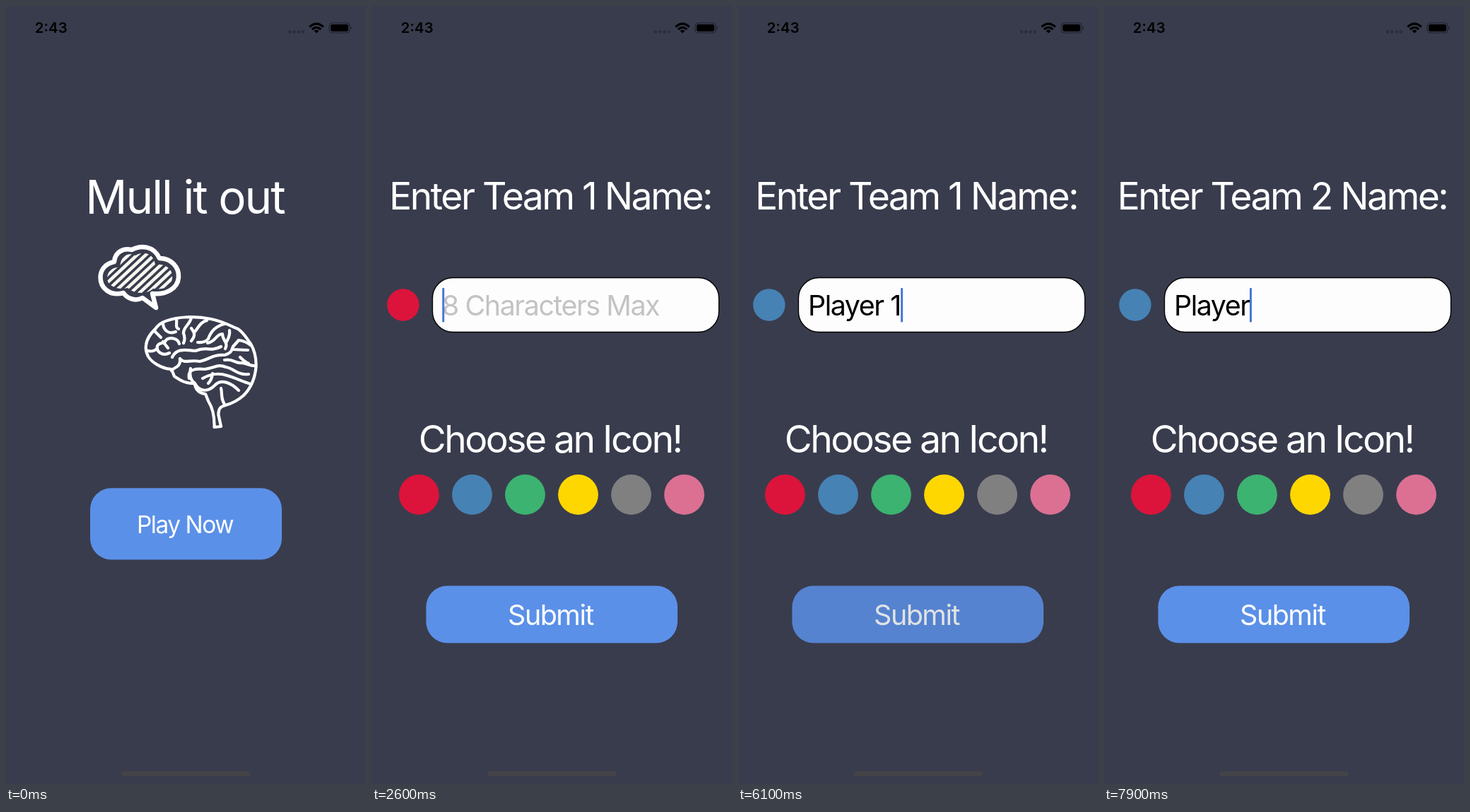
Animation of 509x1101 px, one loop 8000 ms. Source, as an HTML page:

```html
<!DOCTYPE html>
<html lang="en">
<head>
<meta charset="utf-8">
<title>Quiz setup</title>
<style>
html, body { margin: 0; height: 100%; overflow: hidden; background: #393c4d; }
svg { display: block; width: 100%; height: 100%; }
text { font-family: Inter, Roboto, "Liberation Sans", sans-serif; fill: #fff; white-space: pre; }
.mid { text-anchor: middle; }
.title { font-size: 65.5px; letter-spacing: -.03em; }
.head { font-size: 53.5px; letter-spacing: -.048em; }
.label { font-size: 39.4px; letter-spacing: -.037em; }
.play { font-size: 33.4px; letter-spacing: -.043em; }
.time { font-size: 20.5px; font-weight: 600; fill: #000; }
.line { fill: none; stroke: #fff; stroke-linecap: round; stroke-linejoin: round; }
</style>
</head>
<body>
<svg viewBox="0 0 509 1101">
  <defs>
    <pattern id="stripes" width="8.3" height="8.3" patternUnits="userSpaceOnUse" patternTransform="rotate(-43)">
      <rect width="9" height="4.600" fill="#f6f8f0"/>
    </pattern>
  </defs>
  <rect width="509" height="1101" fill="#393c4d"/>

  <text class="time" x="40.700" y="38.3">2:43</text>
  <g fill="#2b2d3a">
    <circle cx="401" cy="36.5" r="2.2"/><circle cx="407.3" cy="36.5" r="2.2"/>
    <circle cx="413.6" cy="36.5" r="2.2"/><circle cx="419.9" cy="36.5" r="2.2"/>
  </g>
  <g fill="none" stroke="#000" stroke-width="3.1">
    <path d="M429.3 29.6Q439 20.8 448.7 29.6M432.8 33.2Q439 27.6 445.2 33.2"/>
    <path d="M439 38.6L435.6 35.2Q439 32.4 442.4 35.2Z" fill="#000" stroke="none"/>
  </g>
  <rect x="457" y="24" width="29" height="14" rx="4" fill="none" stroke="#1d1e27"/>
  <rect x="459" y="26" width="25" height="10" rx="2.4"/>
  <path d="M487.6 28.8q2.6 2.2 0 4.6z" fill="#1d1e27"/>
  <rect x="163.500" y="1083" width="182" height="7" rx="3.5" fill="#444448"/>

  <g id="home">
    <text class="title mid" x="253" y="294">Mull it out</text>
    <path class="line" stroke-width="6.500" d="M153 362C154 348 166 342 178 345C190 338 209 339 217 357C234 357 245 370 244 384C243 400 226 409 207 407L212 427L193 413C184 418 172 415 166 406C148 411 133 400 133.500 383C134 372 142 364 153 362Z"/>
    <path fill="url(#stripes)" d="M161 370C162 353 172 348 183 353C195 346 209 350 211 366C226 364 237 373 235 386C233 398 222 402 208 400C200 408 182 408 172 399C155 403 142 394 143 384C144 374 153 369 161 370Z"/>
    <g class="line" stroke-width="4.200">
      <path d="M198 480C199 470 205 463 212 456C216 449 225 445 240 442C258 439 276 440 290 443C306 446 318 453 328 457C337 463 341 472 346 478C353 490 354 500 353.500 511C352 527 346 541 336 551C326 560 318 563 310 565C303 567 300 570 300.500 579L304 595L294.500 596C295 580 291 567 286 559L282 549C272 548 267 541 267 534C253 535 244 528 238 524L234 514C219 513 206 504 201 496C198 490 197 486 198 480Z"/>
      <path d="M210 460L219 469M222 450C223 459 230 465 240 461M241 443C242 450 239 455 244 457"/>
      <path d="M262 441C260 451 250 455 251 463Q254 471 251 477M284 445C275 447 272 455 267 461M262 456C267 463 268 466 262 474"/>
      <path d="M309 450C296 453 289 462 286 471Q281 477 271 476M285 477C297 475 297 464 306 464C306 474 315 476 310 485M316 459Q317 466 312 475"/>
      <path d="M235 497C242 482 258 488 268 488C284 481 288 490 304 482M231 491C221 496 212 489 214 481C218 474 224 480 226 473C232 468 243 470 245 478M201 488Q209 490 214 484M222 475L229 484"/>
      <path d="M246 499C252 507 260 500 274 503C288 500 292 493 309 494C320 491 319 486 321 482L329 473M246 500C247 512 237 511 234 516M321 486L342 487"/>
      <path d="M309 501C323 499 323 506 333 505C342 506 345 510 353 509M331 497Q338 504 343 506M329 473Q338 474 346 480"/>
      <path d="M259 527C256 513 270 513 281 514C296 512 299 506 311 511C323 513 327 523 343 521M278 527C290 520 301 519 313 523C324 526 333 531 346 535M292 520Q291 529 286 534"/>
      <path d="M267 534C275 549 288 544 295 537C304 527 318 533 329 544M304 541C306 549 303 556 310 565M261 513Q258 528 267 534"/>
    </g>
    <rect id="playBox" x="119" y="682.300" width="271" height="101.200" rx="30"/>
    <text id="playText" class="play mid" x="253" y="745.500">Play Now</text>
  </g>

  <g id="form">
    <text id="heading" class="head mid" x="252" y="287.500"></text>
    <g id="field">
      <rect x="85.500" y="384.500" width="405" height="77" rx="29" fill="#fdfdfd" stroke="#000" stroke-width="1.4"/>
      <text id="entry" class="label" x="99" y="438"></text>
      <rect id="caret" y="399" width="3" height="48.500" rx="1" fill="#4676d8"/>
    </g>
    <text class="head mid" x="251.500" y="632">Choose an Icon!</text>
    <g id="icons"><circle id="chosen" cx="44" cy="423" r="22.700"/></g>
  </g>
  <g id="submit">
    <rect x="76.500" y="820.500" width="355.500" height="81" rx="30" fill="#5b90e8"/>
    <text class="label mid" x="252.500" y="876">Submit</text>
  </g>
</svg>
<script>
const $ = id => document.getElementById(id);
const LOOP = 8000;
const colors = ['#dc143c', '#4682b4', '#3cb371', '#ffd700', '#808080', '#db7093'];
const typing = [[0, ''], [3400, 'P'], [3800, 'Playe'], [4200, 'Player'], [4500, 'Player 1'],
                [6400, ''], [6800, 'Playe'], [7900, 'Player']];

const dots = colors.map((fill, i) => {
  const dot = document.createElementNS('http://www.w3.org/2000/svg', 'circle');
  const attrs = { cx: 66.5 + 75 * i, cy: 691.5, r: 28.4, fill };
  for (const key in attrs) dot.setAttribute(key, attrs[key]);
  return $('icons').appendChild(dot);
});

const show = (el, on) => el.setAttribute('display', on ? 'inline' : 'none');
const fade = (el, pressed) => el.setAttribute('opacity', pressed ? .85 : 1);
const move = (el, x, y) => el.setAttribute('transform', `translate(${x} ${y})`);

function draw(t) {
  const within = (a, b) => t >= a && t < b;
  const ready = t >= 2600;

  show($('home'), t < 1900);
  show($('form'), t >= 1900);
  show($('submit'), t >= 1900);
  const playing = within(1100, 1900);
  $('playBox').setAttribute('fill', playing ? '#0064d2' : '#5b90e8');
  $('playText').setAttribute('opacity', playing ? .52 : 1);

  // The icon row pushes the form up and the button down.
  const gap = ready ? 0 : 24.4;
  move($('form'), 0, gap);
  move($('submit'), 0, -gap);
  move($('field'), ready ? 0 : -33.5, 0);
  show($('icons'), ready);
  $('heading').textContent = `Enter Team ${t < 6400 ? 1 : 2} Name:`;
  $('chosen').setAttribute('fill', colors[t < 5300 ? 0 : 1]);
  fade(dots[1], within(4900, 5700));
  fade($('submit'), within(5700, 6800));

  const value = typing.findLast(step => t >= step[0])[1];
  const entry = $('entry');
  entry.textContent = value || '8 Characters Max';
  entry.style.fill = value ? '#000' : '#c3c3c5';
  show($('caret'), ready && !within(5700, 6100));
  $('caret').setAttribute('x', 99.3 + (value && t >= 1900 ? entry.getComputedTextLength() : 0));
}

const start = performance.now();
function tick() {
  draw((performance.now() - start) % LOOP);
  requestAnimationFrame(tick);
}
tick();
</script>
</body>
</html>
```
